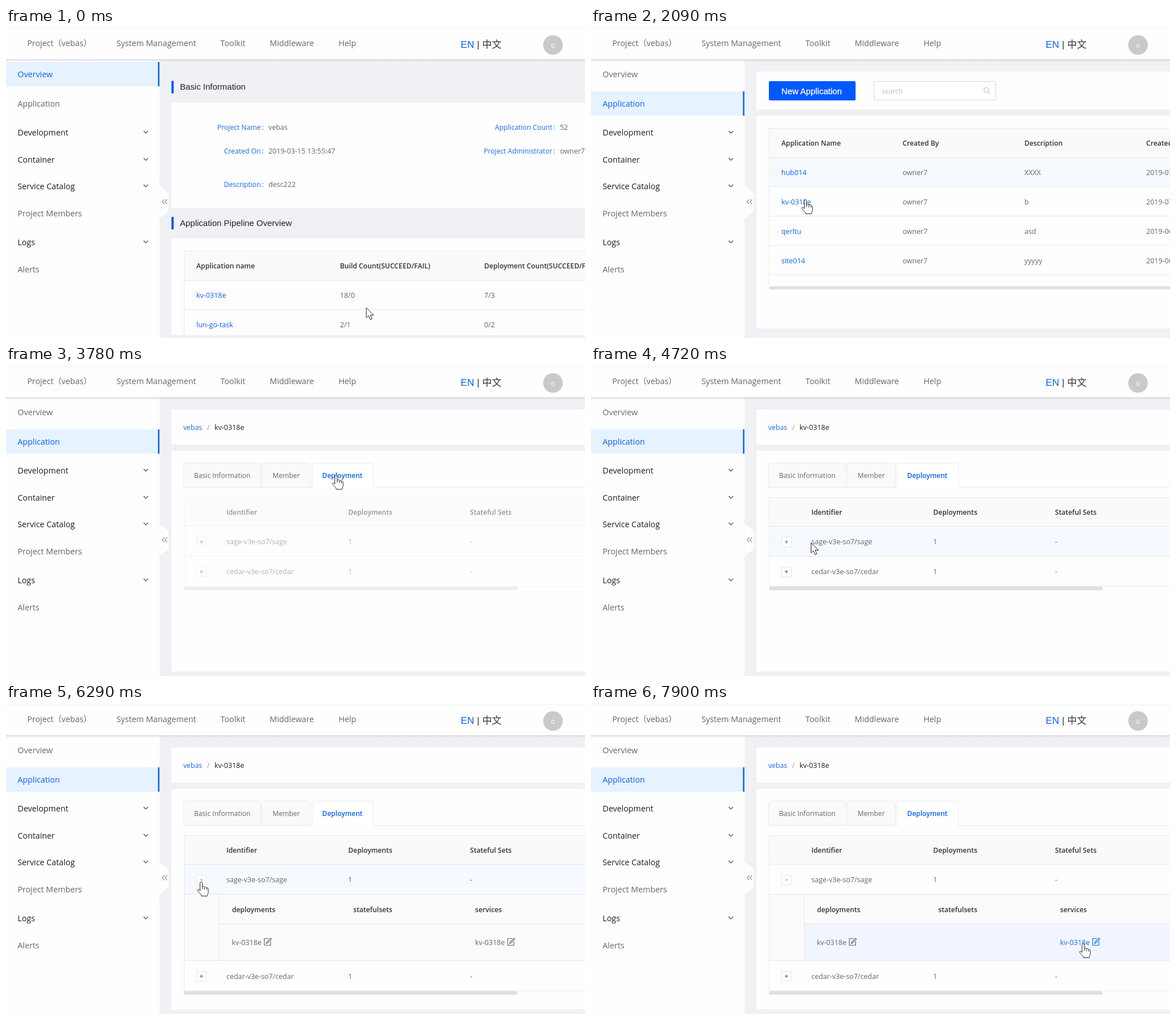
These frames come from a looping animation (1022x548 px, 8000 ms). An HTML page:

```html
<!DOCTYPE html>
<html lang="en">
<head>
<meta charset="utf-8">
<title>Project console</title>
<style>
html, body { margin: 0; width: 100%; height: 100%; overflow: hidden; background: #f0f1f4; }
svg { display: block; width: 100vw; height: 100vh; }
text { font: 12.5px "Open Sans", "Noto Sans", "Noto Sans CJK SC", sans-serif; fill: #666; white-space: pre; }
.nav { font-size: 14.3px; }
.dark { fill: #1c1c1c; }
.blue { fill: #0b61f2; }
.label { font-size: 12.2px; fill: #1668ee; }
.head { font-size: 12.2px; font-weight: 600; fill: #333; }
.tab { font-size: 12.1px; }
.tabOn { font-size: 12.1px; font-weight: 600; fill: #0b61f2; }
.count { fill: #55617a; }
.title { font: 15px "Liberation Sans", sans-serif; fill: #222; }
.button { font-size: 14px; fill: #fff; }
.line { fill: none; stroke: #e8e8e8; }
.link { color: #666; }
.link text { fill: currentColor; }
.link path { fill: none; stroke: currentColor; stroke-width: 1.2; }
.link.on { color: #1668ee; }
</style>
</head>
<body>
<svg id="stage" viewBox="0 0 1022 548" preserveAspectRatio="none"></svg>
<script>
const BLUE = '#0058ff', HOVER = '#f6faff';
const rect = (x, y, x2, y2, fill, extra = '') =>
  `<rect x="${x}" y="${y}" width="${x2 - x}" height="${y2 - y}" fill="${fill}" ${extra}/>`;
const text = (x, y, s, cls = '', extra = '') => `<text x="${x}" y="${y}" class="${cls}" ${extra}>${s}</text>`;
const path = (d, extra = 'class="line"') => `<path d="${d}" ${extra}/>`;
const group = (id, ...parts) => `<g id="${id}">${parts.join('')}</g>`;
const panel = (y, y2) => rect(292, y, 1040, y2, '#fefefe');
const rules = (x, ...ys) => ys.map(y => path(`M${x} ${y + .5}H1030`)).join('');
const cells = (y, xs, values, cls = '') => values.map((v, i) => text(xs[i], y, v, cls)).join('');
const field = (end, y, name, value) =>
  text(end, y, name, 'label', 'text-anchor="end"') + text(end + 2, y, ':', 'label') + text(end + 13.5, y, value);
const section = (y, s) => rect(292, y + .5, 296, y + 22.5, BLUE) + text(307, y + 16, s, 'title');
const button = (x, x2, s, tx) => rect(x, 253, x2, 288.5, BLUE, 'rx="2"') + text(tx, 276.3, s, 'button');

const names = { project: 'vebas', owner: 'owner7', app: 'kv-0318e', first: 'sage-v3e-so7/sage', second: 'cedar-v3e-so7/cedar' };

function overview() {
  const cols = [336, 589.5, 844];
  return group('overview',
    section(93, 'Basic Information'), panel(132, 318),
    field(449.7, 180, 'Project Name', names.project), field(964.2, 180, 'Application Count', '52'),
    field(449.7, 222, 'Created On', '2019-03-15 13:55:47'), field(964.2, 222, 'Project Administrator', names.owner),
    field(449.7, 280.5, 'Description', 'desc222'),
    section(333.5, 'Application Pipeline Overview'), panel(372, 543),
    rect(314, 394, 1030, 446, '#fafafa'), rules(314, 394, 446, 497), path('M314.5 394V543'),
    cells(425, cols, ['Application name', 'Build Count(SUCCEED/FAIL)', 'Deployment Count(SUCCEED/FAIL)'], 'head'),
    text(336, 477, names.app, 'blue'), cells(477, cols.slice(1), ['18/0', '7/3'], 'count'),
    text(336, 529, 'lun-go-task', 'blue'), cells(529, cols.slice(1), ['2/1', '0/2'], 'count'));
}

function applications() {
  const cols = [336, 550, 765, 980];
  const rows = [['hub014', 'XXXX', '07-29'], [names.app, 'b', '07-25'], ['qerltu', 'asd', '06-28'], ['site014', 'yyyyy', '06-21']];
  const dots = [0, 1, 2, 3].map(i => {
    const a = (-69 + i * 90) * Math.PI / 180;
    return `<circle cx="${849 + 9 * Math.cos(a)}" cy="${361.4 + 9 * Math.sin(a)}" r="3.7" fill="#a7c5ff"/>`;
  }).join('');
  return group('applications',
    panel(77, 144), rect(314, 94, 467, 128, BLUE, 'rx="2"'),
    text(336, 117, 'New Application', 'title', 'style="fill:#fff;stroke:#fff;stroke-width:.3"'),
    rect(499.5, 94.5, 714.5, 127.5, '#fff', 'stroke="#d9d9d9" rx="1"'),
    text(513, 115.5, 'search', 'tab', 'style="fill:#bfbfbf"'),
    path('M701.5 113.5l3 3M702 109.7a4.2 4.2 0 1 0-8.4 0a4.2 4.2 0 1 0 8.4 0', 'fill="none" stroke="#aaa"'),
    group('loading', panel(155, 525), rect(314, 525, 1030, 536, '#f5f6f8'), rect(292, 536, 1040, 542.5, '#d5d6d8', 'rx="3"')),
    group('loaded', panel(155, 531)),
    group('appTable',
      rect(314, 177, 1030, 229, '#fafafa'), group('appRow1', rect(314, 229, 1030, 281, HOVER)), group('appRow2', rect(314, 281, 1030, 333, HOVER)),
      rules(314, 177, 229, 280, 332, 384, 436), path('M314.5 177V457'), rect(314, 456.5, 1040, 462, '#dfdfdf', 'rx="2.5"'),
      cells(208, cols, ['Application Name', 'Created By', 'Description', 'Created On'], 'head'),
      rows.map(([name, about, day], i) => text(336, 260 + i * 52, name, 'blue') +
        cells(260 + i * 52, cols.slice(1), [names.owner, about, '2019-' + day])).join('')),
    group('spinner', dots));
}

function tabs(id, active, items) {
  return group(id, path('M313.5 214.5H1030'), items.map(([x, x2, tx, s], i) =>
    path(`M${x}.5 214.5V175.5q0-4 4-4H${x2 - 4}.5q4 0 4 4V214.5`, `fill="${i === active ? '#fff' : '#fafafa'}" stroke="#ebebeb"`) +
    (i === active ? path(`M${x + 1} 214.5H${x2}`, 'stroke="#fff" stroke-width="2"') : path(`M${x} 214.5H${x2 + 1}`)) +
    text(tx, 198, s, i === active ? 'tabOn' : 'tab', i === 2 && active === 0 ? 'id="deployTab"' : '')).join(''));
}

const toggle = (y, sign) => rect(336.5, y - 8.5, 353.5, y + 8.5, '#fff', 'stroke="#e4e4e4"') +
  path(sign === '+' ? `M342 ${y}h6M345 ${y - 3}v6` : `M343.3 ${y}h3.4`, 'stroke="#7a6a60" stroke-width="1.2"');
const editLink = (id, x) => `<g id="${id}" class="link">${text(x, 425.8, names.app)}` +
  path(`M${x + 65} 414.5h-7.5v12h11v-7M${x + 61} 423.5l1-3 6.5-6.5 1.6 1.6-6.5 6.5z`, '') + '</g>';

function detail() {
  const cols = [389, 604, 819], sub = [399, 613, 828];
  const info = [['Name', names.app], ['Language', 'lova'], ['Project Name', names.project],
    ['Created On', '2019-07-25 11:04:09'], ['Description', 'b']];
  return group('detail',
    panel(77, 139), text(313, 113, names.project, 'label'), text(355, 113, '/', 'tab', 'style="fill:#999"'),
    text(368, 113, names.app, 'dark'), panel(150, 540),
    group('infoPage',
      tabs('infoTabs', 0, [[313, 452, 332, 'Basic Information'], [455, 541, 474, 'Member'], [544, 649, 562, 'Deployment']]),
      rect(314, 260, 318, 282, BLUE), text(329, 276.3, 'Basic Information', '', 'style="font-size:14px"'),
      button(465, 537, 'Edit', 488), button(547, 636, 'Delete', 569.5),
      group('infoFields', info.map(([k, v], i) => field(428.3, 336.5 + i * 42.3, k, v)).join(''))),
    group('deployPage',
      tabs('deployTabs', 2, [[313, 449, 332, 'Basic Information'], [451, 537, 470.5, 'Member'], [540, 648, 558, 'Deployment']]),
      group('deployTable',
        rect(314, 232, 1030, 284, '#fafafa'), group('deployRow', rect(314, 284, 1030, 337, '#f6f9ff')),
        rules(314, 232, 283, 336), path('M314.5 232V390'),
        cells(263, cols, ['Identifier', 'Deployments', 'Stateful Sets'], 'head'),
        cells(315, cols, [names.first, '1', '-']),
        group('plus', toggle(311, '+')), group('minus', toggle(311, '-')),
        group('expanded',
          rect(314, 337, 1030, 454, '#fbfbfb'), group('subRow', rect(377, 389, 1030, 454, '#f1f5ff')),
          rules(376, 388), rules(314, 336, 453), path('M376.5 337V454M314.5 337V507'),
          cells(367.8, sub, ['deployments', 'statefulsets', 'services'], 'head'),
          editLink('deployLink', 398.5), editLink('serviceLink', 828)),
        group('lastRow', rules(314, 389), cells(368, cols, [names.second, '1', '-']), toggle(363.7, '+'),
          rect(314, 390, 903, 396.5, '#e0e0e0', 'rx="3"')))));
}

function frame() {
  const menu = [['Overview', 87], ['Application', 139], ['Development', 190, 1], ['Container', 238, 1], ['Service Catalog', 285, 1],
    ['Project Members', 333], ['Logs', 384, 1], ['Alerts', 432]];
  const item = (i, y) => group('menuBg' + i, rect(0, y, 271, y + 43, '#e6f2ff')) + group('menuBar' + i, rect(268.3, -21.5, 270.7, 21.5, BLUE));
  return path('M271 274C271 285 288 284 288 297V319C288 331 271 330 271 342Z', 'fill="#fefefe" stroke="#e6e8eb" stroke-width=".6"') +
    rect(0, 55, 271, 548, '#fefefe') +
    path('M279.5 303l-4 4.2 4 4.2M284.5 303l-4 4.2 4 4.2', 'fill="none" stroke="#8c8c8c" stroke-width="1.1"') +
    item(0, 60) + item(1, 112) +
    menu.map(([s, y, parent], i) => text(20.5, y, s, parent ? 'nav dark' : 'nav', `id="menu${i}"`) +
      (parent ? path(`M243 ${y - 8}l3.8 3.8 3.8-3.8`, 'fill="none" stroke="#444" stroke-width="1.2"') : '')).join('') +
    rect(0, 55, 1022, 60, 'url(#shade)') + rect(0, 0, 1022, 55, '#fefefe') + rect(0, 0, 1022, 1.3, '#e4fbf5') +
    cells(32, [37.5, 195, 378.5, 465.5, 587], [`Project（${names.project}）`, 'System Management', 'Toolkit', 'Middleware', 'Help'], 'nav') +
    `<text x="802.5" y="34.5" style="font:17.2px 'Liberation Sans','Noto Sans CJK SC',sans-serif;fill:#333"><tspan fill="#0b61f2">EN</tspan> | 中文</text>` +
    '<circle cx="965.5" cy="30" r="17.3" fill="#c9c9c9"/>' + text(965.5, 35, 'o', '', 'text-anchor="middle" style="fill:#fff"');
}

document.getElementById('stage').innerHTML =
  '<linearGradient id="shade" x2="0" y2="1"><stop stop-color="#d9dbde"/><stop offset="1" stop-color="#d9dbde" stop-opacity="0"/></linearGradient>' +
  rect(0, 0, 1022, 548, '#f0f1f4') + overview() + applications() + detail() + frame() +
  group('cursor',
    group('arrow', path('M.5 .5V18.3L4.7 14.6 7.6 21.6 10.6 20.3 7.7 13.5H13.4Z', 'fill="#fff" stroke="#222" stroke-linejoin="round"')),
    group('hand', path('M-2 2.5a2 2 0 0 1 4 0v7c.5-1.5 3.5-1.5 4 .5c1-1 3.5-.5 3.7 1.2c1.3-.8 2.8 0 2.8 2v6c0 2-2 3.5-2 6.3h-10c0-3-5.5-7-6.8-9.5c-.8-1.8 1.3-3 2.8-1.5l1.5 1.8z',
      'fill="#fff" stroke="#222" stroke-linejoin="round"'), path('M2 9.5v4M6 10.5v3.5M9.7 11.5v3', 'stroke="#222" fill="none"')),
    group('click', '<circle r="14.4" fill="#ff0" opacity=".47"/>'));

// Bursts of screen updates: first time, last time, number of updates.
const bursts = [[80, 770, 10], [920, 1310, 6], [1560, 2320, 11], [2410, 2800, 6], [3010, 3470, 7], [3610, 3610, 1], [3780, 4090, 5],
  [4500, 5120, 9], [5580, 5580, 1], [5730, 5730, 1], [5890, 5890, 1], [6290, 7050, 11], [7130, 7900, 11]];
function snap(t) {
  const burst = bursts.filter(b => b[0] <= t).pop();
  if (!burst) return 0;
  const [start, end, count] = burst;
  if (count === 1) return start;
  const gap = (end - start) / (count - 1);
  return start + gap * Math.min(count - 1, Math.floor((t - start) / gap + .2));
}

// Pointer path: time, x, y.
const route = [[0, 635.5, 494], [770, 106, 131], [1490, 106, 131], [2092, 378.5, 303], [2320, 377, 306], [2930, 377, 306],
  [3470, 582.5, 192.5], [4420, 582.5, 192.5], [4732, 388, 312], [4890, 350, 314], [5120, 341.5, 310], [6210, 341.5, 310],
  [6290, 344.5, 314], [7050, 466, 419], [7900, 868.8, 423], [8000, 868.8, 423]];
const clamp = v => Math.max(0, Math.min(1, v));
function pointer(t) {
  const i = route.findIndex(k => k[0] > t), [t0, x0, y0] = route[i - 1], [t1, x1, y1] = route[i];
  const p = (t - t0) / (t1 - t0), e = p * p * (3 - 2 * p);
  return [x0 + (x1 - x0) * e, y0 + (y1 - y0) * e];
}

const el = id => document.getElementById(id);
const show = (id, on) => { el(id).style.display = on ? '' : 'none'; };
const fade = (id, v) => { el(id).style.opacity = clamp(v); };
const tint = (id, on) => { el(id).style.fill = on ? '#0b61f2' : '#666'; };
const bar = (i, y, v) => {
  el('menuBar' + i).setAttribute('transform', `translate(0 ${y}) scale(1 ${v})`);
  fade('menuBar' + i, v * 1.25);
};

function draw(time) {
  const t = snap(time), [x, y] = pointer(t);
  const within = (a, b, c, d) => x >= a && x <= c && y >= b && y <= d;
  const between = (a, b) => t >= a && t < b;
  const isDetail = t >= 2560, isDeploy = t >= 3780, open = t >= 5890;

  show('overview', t < 1060);
  show('applications', between(1060, 2560));
  show('loading', t < 1140);
  show('loaded', t >= 1140);
  show('appTable', t >= 1140);
  fade('appTable', .5 + (t - 1154) / 300);
  show('spinner', t < 1300);
  fade('spinner', 1 - (t - 1076) / 230);
  el('spinner').setAttribute('transform', `rotate(${(t - 1076) * .3} 849 361.4)`);
  show('appRow1', between(1560, 2150) && y > 229 && x > 314);
  show('appRow2', between(2150, 2560));

  show('detail', isDetail);
  show('infoPage', !isDeploy);
  fade('infoFields', .4 + (t - 2560) / 240);
  const onTab = within(544, 172, 650, 214);
  tint('deployTab', onTab);
  show('deployPage', isDeploy);
  fade('deployTable', .5 + (t - 3780) / 300);
  show('deployRow', isDeploy && within(314, 284, 1022, 336));
  show('plus', !open);
  show('minus', open);
  show('expanded', open);
  el('lastRow').setAttribute('transform', `translate(0 ${open ? 117.5 : 0})`);
  show('subRow', y > 389);
  const onDeploy = open && within(398, 412, 469, 430), onService = open && within(827, 412, 898, 430);
  el('deployLink').classList.toggle('on', onDeploy);
  el('serviceLink').classList.toggle('on', onService);

  const move = clamp((t - 1020) / 250), slide = clamp((t - 1020) / 155);
  fade('menuBg0', 1 - move * .7 - (move === 1 ? .3 : 0));
  fade('menuBg1', move);
  bar(0, 81.5, (1 - slide) ** 4);
  bar(1, 133.5, slide);
  const onMenu = within(0, 112, 270, 155);
  tint('menu0', t < 1150);
  tint('menu1', t >= 1060 || onMenu);

  const onToggle = isDeploy && within(336, 302, 354, 320);
  const hand = onMenu || between(2085, 2560) || (isDetail && onTab) || onToggle || onDeploy || onService;
  show('hand', hand);
  show('arrow', !hand);
  show('click', between(920, 1060) || between(2410, 2560) || between(3610, 3780) || between(5580, 5730));
  el('cursor').setAttribute('transform', `translate(${x} ${y})`);
}

const begin = performance.now();
(function tick() {
  draw((performance.now() - begin) % 8000);
  requestAnimationFrame(tick);
})();
</script>
</body>
</html>
```
